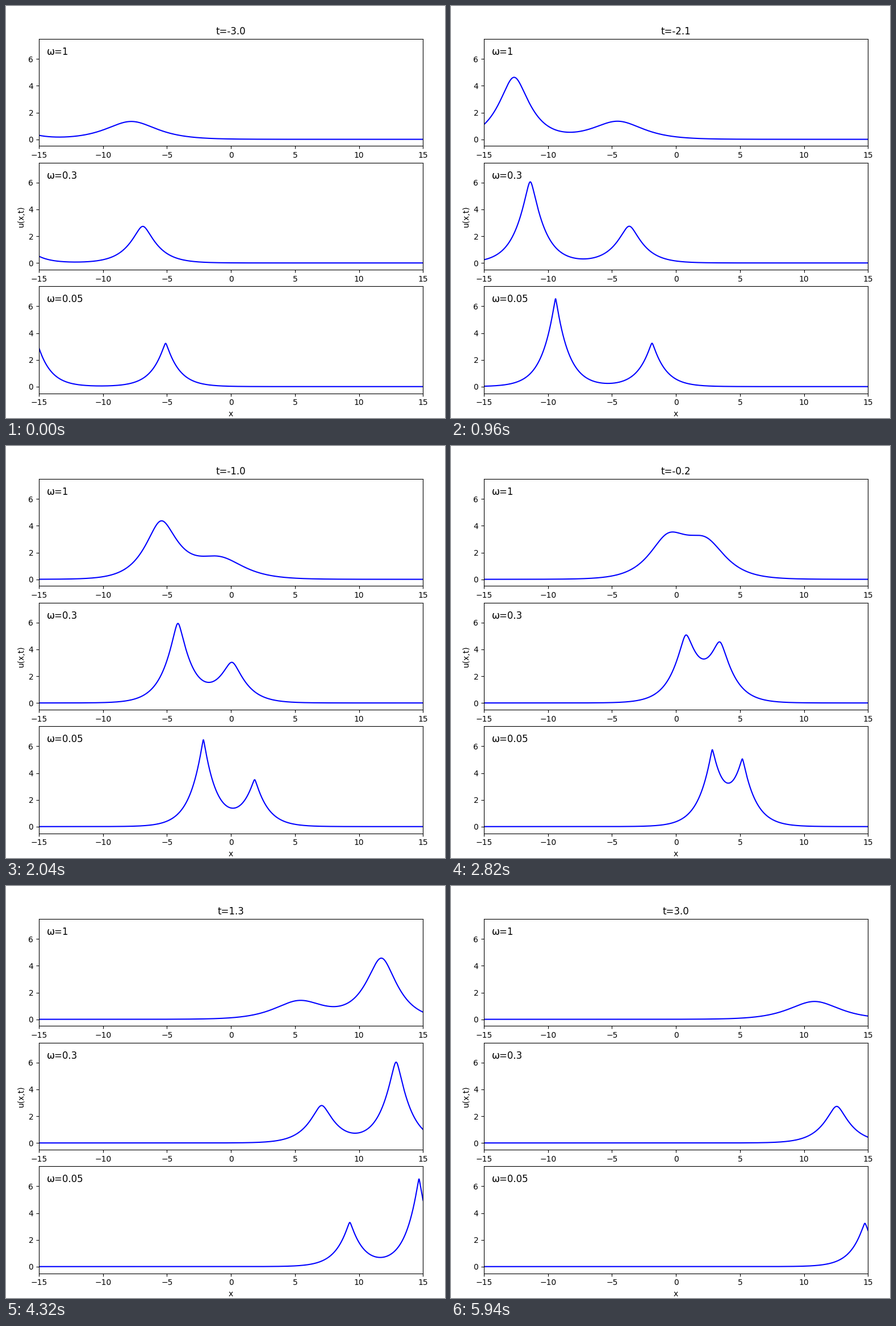
A matplotlib script that plays this animation: 773x725 px, repeating every 6 s.

```python
import numpy as np
import matplotlib.pyplot as plt
from matplotlib.animation import FuncAnimation

WIDTH, HEIGHT, DPI = 773, 725, 100
FRAMES, INTERVAL = 100, 60
OMEGAS = (1, 0.3, 0.05)
SPEEDS = np.array([10 / 3, 20 / 3])

times = np.linspace(-3, 3, FRAMES)
z = np.linspace(-42, 22, 4000)


def two_solitons(omega, t):
    """Parametric two-soliton solution (x, u) of the shallow-water equation."""
    p1, p2 = p = np.sqrt(1 - 2 * omega / SPEEDS)
    coupling = ((p1 - p2) / (p1 + p2)) ** 2
    rate1, rate2 = p * SPEEDS
    e1, e2 = (np.exp(-k * (z - c * t)) / k for k, c in zip(p, SPEEDS))

    def tau(sign):
        b1, b2 = ((1 + p) / (1 - p)) ** sign
        a, b = e1 * b1, e2 * b2
        both = coupling * a * b
        f = 1 + a + b + both
        f_t = rate1 * a + rate2 * b + (rate1 + rate2) * both
        return np.log(f), f_t / f

    log_plus, rate_plus = tau(1)
    log_minus, rate_minus = tau(-1)
    return z + log_plus - log_minus, rate_plus - rate_minus


plt.rcParams["font.family"] = "DejaVu Sans"
fig, axes = plt.subplots(3, 1, figsize=(WIDTH / DPI, HEIGHT / DPI), dpi=DPI)
fig.subplots_adjust(left=0.075, right=0.95, bottom=0.06, top=0.92, hspace=0.155)

lines = []
for ax, omega in zip(axes, OMEGAS):
    ax.set_xlim(-15, 15)
    ax.set_ylim(-0.5, 7.5)
    ax.set_yticks([0, 2, 4, 6])
    ax.text(0.02, 0.85, f"ω={omega}", fontsize=12, transform=ax.transAxes)
    lines += ax.plot([], [], color="blue", lw=1.5)

title = axes[0].set_title("", fontsize=12)
axes[1].set_ylabel("u(x,t)")
axes[2].set_xlabel("x")


def update(frame):
    t = times[frame]
    title.set_text(f"t={np.floor(t * 10) / 10:.1f}")
    for line, omega in zip(lines, OMEGAS):
        line.set_data(*two_solitons(omega, t))
    return [title, *lines]


anim = FuncAnimation(fig, update, frames=FRAMES, interval=INTERVAL,
                     repeat=True, repeat_delay=0, blit=False)
plt.show()
```
